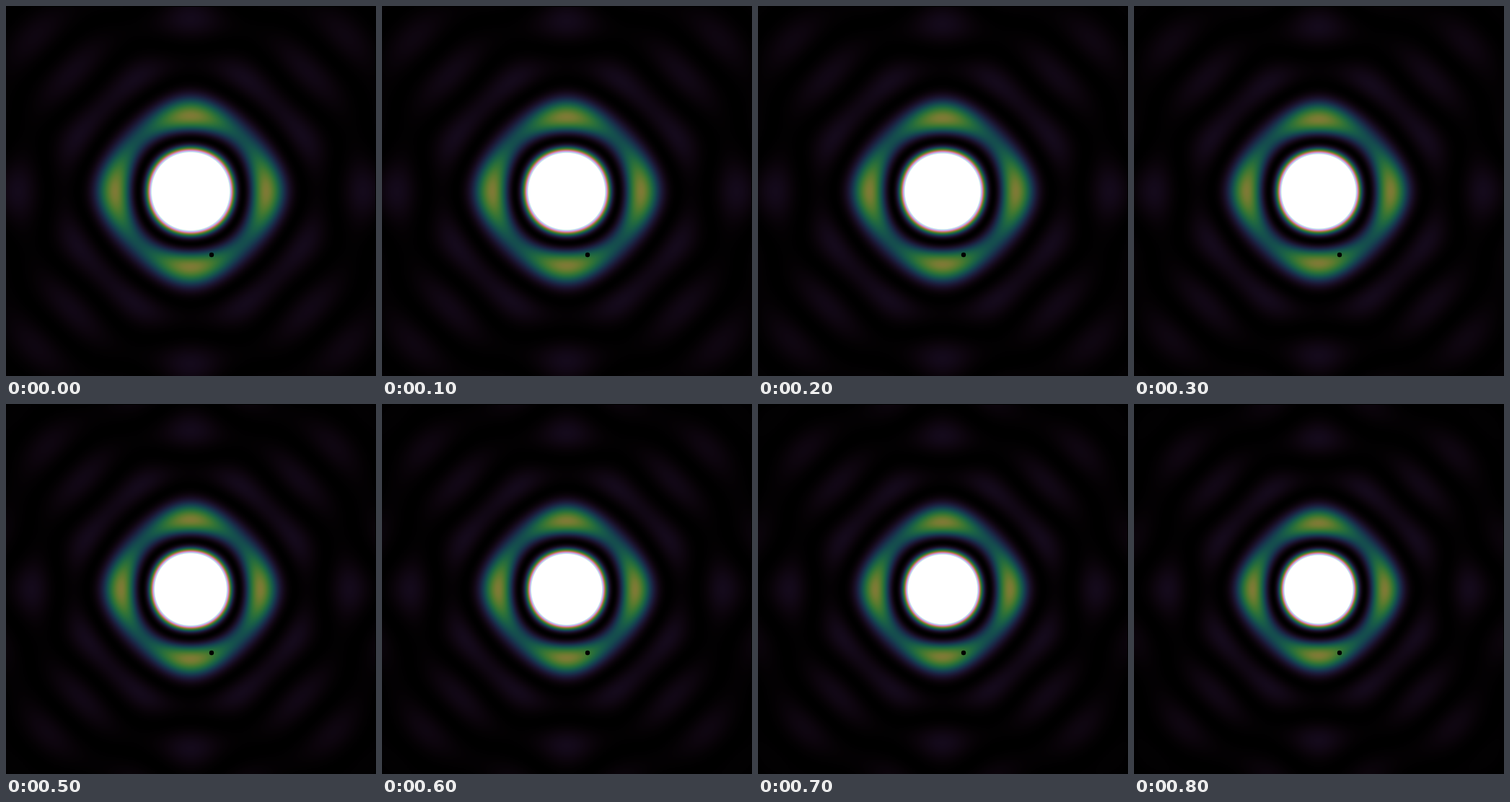
An HTML page with a canvas for the animation above (900 ms loop, 513 by 513 pixels).

```html
<!DOCTYPE html>
<html lang="en">
<head>
<meta charset="utf-8">
<title>Diffraction beam</title>
<style>
  html, body { margin: 0; width: 100%; height: 100%; overflow: hidden; background: #000; }
  canvas { display: block; width: 100vw; height: 100vh; }
</style>
</head>
<body>
<canvas id="beam" width="513" height="513"></canvas>
<script>
const SIZE = 513, HALF = 256, STEPS = 9, STEP_MS = 100;
const WAVE = 0.0488;    // phase per pixel at the first step
const SHRINK = 0.0156;  // pattern scale lost per step
const PEAK = 0.064;     // power shown as white
const DOT = { x: 285, y: 345, r: 3.2 };

// Aperture of unit radius: dimmed centre, hub, four struts whose shadows widen outwards
const DIM = 0.22;
const HUB = { share: 0.028, radius: 0.3 };
const strutWidth = r => 0.027 + 0.09 * Math.max(0, r - 0.6) / 0.4;

const ctx = document.getElementById('beam').getContext('2d');

function integrate(f, a, b, n = 48) {
  const h = (b - a) / n;
  let sum = 0;
  for (let i = 0; i < n; i++) sum += f(a + (i + 0.5) * h);
  return sum * h;
}

const bessel = (n, x) =>
  integrate(t => Math.cos(n * t - x * Math.sin(t)), 0, Math.PI) / Math.PI;
const airy = x => x < 1e-3 ? 1 : 2 * bessel(1, x) / x;
const bowl = x => x < 1e-2 ? 1 : 8 * bessel(2, x) / (x * x);

// Sampled function with linear interpolation
const DENSITY = 100;
function table(f) {
  const values = Float64Array.from({ length: 24 * DENSITY }, (_, i) => f(i / DENSITY));
  return x => {
    const p = x * DENSITY, i = Math.floor(p);
    return values[i] + (values[i + 1] - values[i]) * (p - i);
  };
}

const dish = table(x => airy(x) - DIM / 2 * bowl(x) - HUB.share * airy(x * HUB.radius));
const strutMoment = n => table(u => 2 / Math.PI *
  integrate(r => strutWidth(r) ** n * Math.cos(u * r), 0.16, 1));
const flat = strutMoment(1), cubic = strutMoment(3);
const strut = (u, v) => flat(u) - v * v / 24 * cubic(u);

const field = (x, y) => dish(Math.hypot(x, y)) - strut(x, y) - strut(y, x);

// Cubehelix palette: start 0.5, rotation -1.5
const palette = Array.from({ length: 1025 }, (_, i) => {
  const v = i / 1024, a = v * (1 - v) / 2;
  const phi = 2 * Math.PI * (0.5 / 3 - 1.5 * v);
  const c = Math.cos(phi), s = Math.sin(phi);
  return [
    v + a * (-0.14861 * c + 1.78277 * s),
    v + a * (-0.29227 * c - 0.90649 * s),
    v + a * 1.97294 * c
  ].map(u => 255 * Math.min(1, Math.max(0, u)));
});

function render(step) {
  const img = ctx.createImageData(SIZE, SIZE), d = img.data;
  const k = WAVE / (1 - SHRINK * step);
  const put = (x, y, rgb) => {
    const o = 4 * (y * SIZE + x);
    d[o] = rgb[0]; d[o + 1] = rgb[1]; d[o + 2] = rgb[2]; d[o + 3] = 255;
  };
  for (let j = 0; j < HALF; j++) {
    for (let i = 0; i <= j; i++) {
      const e = field((i + 0.5) * k, (j + 0.5) * k);
      const rgb = palette[Math.round(1024 * Math.min(1, e * e / PEAK))];
      for (const [a, b] of [[i, j], [j, i]]) {
        for (const x of [HALF + a, HALF - 1 - a]) {
          put(x, HALF + 1 + b, rgb);
          put(x, HALF - b, rgb);
        }
      }
    }
  }
  return img;
}

const images = Array.from({ length: STEPS }, (_, i) => render(i));
let shown = -1;

function draw(ms) {
  const step = Math.floor(ms / STEP_MS) % STEPS;
  if (step !== shown) {
    shown = step;
    ctx.clearRect(0, 0, SIZE, SIZE);
    ctx.putImageData(images[step], 0, 0);
    ctx.beginPath();
    ctx.arc(DOT.x, DOT.y, DOT.r, 0, 2 * Math.PI);
    ctx.fill();
  }
}

const start = performance.now();
function tick() {
  draw(performance.now() - start);
  requestAnimationFrame(tick);
}
tick();
</script>
</body>
</html>
```
